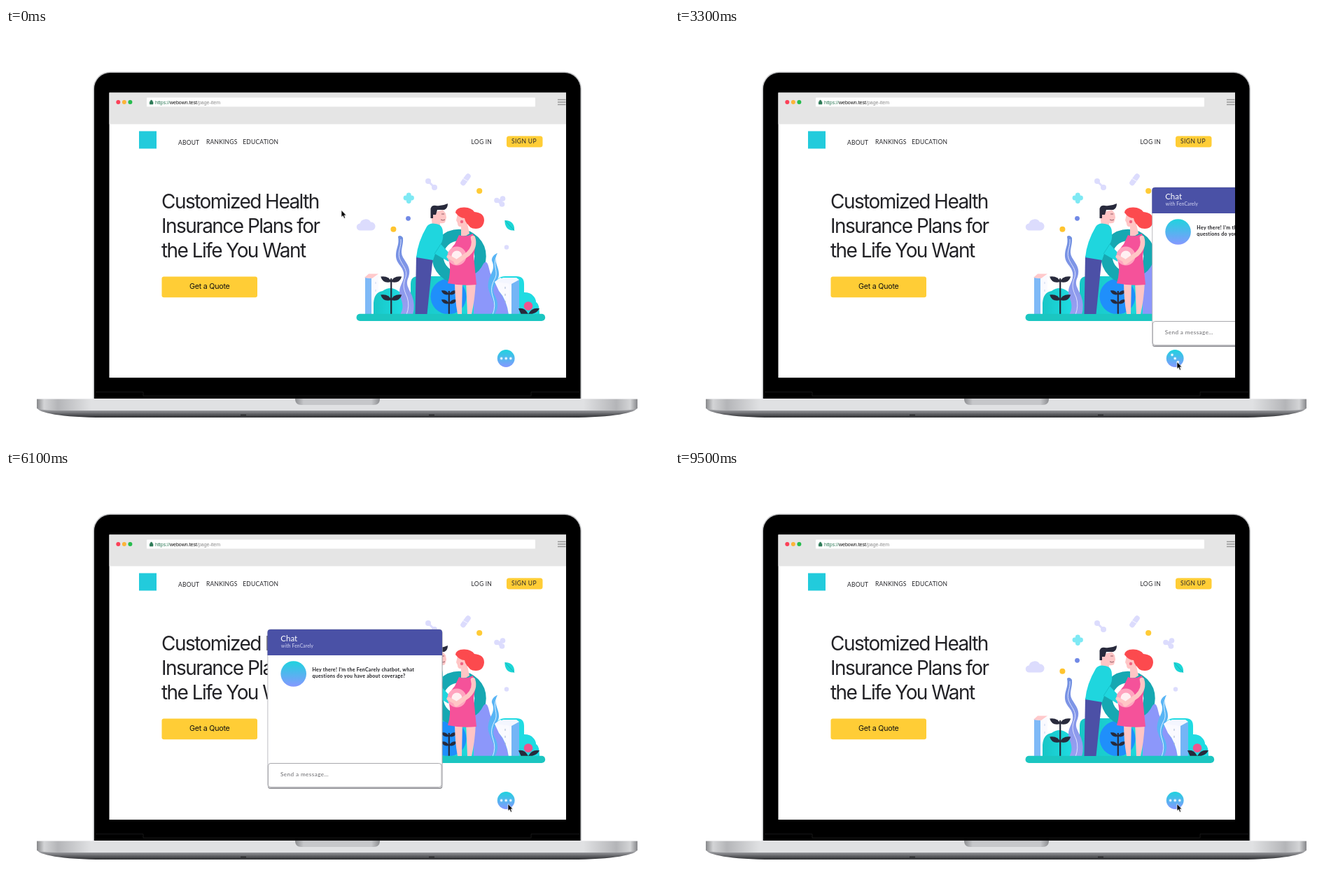
An HTML page that plays this animation: 947x592 px, repeating every 9600 ms.

```html
<!DOCTYPE html>
<html lang="en">
<head>
<meta charset="utf-8">
<title>Chat panel on a laptop</title>
<style>
html, body { margin: 0; width: 100%; height: 100%; overflow: hidden; background: #fff; }
svg { display: block; width: 947px; height: 592px; }
.lato { font-family: Lato, sans-serif; }
.inter { font-family: Inter, sans-serif; font-optical-sizing: none; }
.nav { font-size: 8.5px; letter-spacing: .2px; fill: #26262a; }
.title { font-size: 28px; letter-spacing: -1.55px; fill: #222226; }
.url { font: 7px "Liberation Sans", Arial, sans-serif; }
</style>
</head>
<body>
<svg viewBox="0 0 947 592">
  <defs>
    <linearGradient id="base" x1="0" x2="1" y1="0" y2="0">
      <stop offset="0" stop-color="#86878a"/><stop offset=".012" stop-color="#d3d4d6"/>
      <stop offset=".035" stop-color="#b4b5b8"/><stop offset=".09" stop-color="#e0e1e3"/>
      <stop offset=".91" stop-color="#e0e1e3"/><stop offset=".965" stop-color="#b4b5b8"/>
      <stop offset=".988" stop-color="#d3d4d6"/><stop offset="1" stop-color="#86878a"/>
    </linearGradient>
    <linearGradient id="under" x1="0" x2="0" y1="0" y2="1">
      <stop offset="0" stop-color="#b9babd"/><stop offset=".4" stop-color="#85868a"/>
      <stop offset="1" stop-color="#2c2d30"/>
    </linearGradient>
    <linearGradient id="notch" x1="0" x2="1" y1="0" y2="0">
      <stop offset="0" stop-color="#8d8e91"/><stop offset=".1" stop-color="#c6c7ca"/>
      <stop offset=".9" stop-color="#c6c7ca"/><stop offset="1" stop-color="#8d8e91"/>
    </linearGradient>
    <linearGradient id="aqua" x1="0" x2="0" y1="0" y2="1">
      <stop offset="0" stop-color="#1fd3de"/><stop offset="1" stop-color="#8598ff"/>
    </linearGradient>
    <linearGradient id="bush" x1="0" x2="1" y1="0" y2="0">
      <stop offset="0" stop-color="#18c6c6"/><stop offset="1" stop-color="#1fdde4"/>
    </linearGradient>
    <linearGradient id="weed" x1="0" x2="0" y1="0" y2="1">
      <stop offset="0" stop-color="#6f8fe0"/><stop offset="1" stop-color="#9a9ff2"/>
    </linearGradient>
    <clipPath id="screen"><rect x="147.5" y="92.5" width="652.5" height="407.5"/></clipPath>
    <clipPath id="soil"><rect x="490" y="200" width="300" height="210"/></clipPath>
  </defs>

  <!-- laptop -->
  <path d="M124.500 530V87a24.500 24.500 0 0 1 24.500-24.500H797.500a24.500 24.500 0 0 1 24.500 24.500V530Z" fill="#c3c4c6"/>
  <path d="M126 530V87a23 23 0 0 1 23-23H797.500a23 23 0 0 1 23 23V530Z"/>
  <path d="M128 520.500H196V526H750V520.500H819" fill="none" stroke="#1c1c1e" stroke-width=".8"/>
  <path d="M44 543H902C900 550 868 557 806 557H140C78 557 46 550 44 543Z" fill="url(#under)"/>
  <path d="M44 530H902V544C896 546.500 880 547 860 547H86C66 547 50 546.500 44 544Z" fill="url(#base)"/>
  <path d="M44 530.400H902" stroke="#f0f0f1" stroke-width=".8"/>
  <path d="M413 530H534C534 536 531 539 525 539H422C416 539 413 536 413 530Z" fill="url(#notch)"/>
  <path d="M335 553.500H343M604 553.500H612" stroke="#222224" stroke-width="1.500"/>

  <g clip-path="url(#screen)">
    <rect x="147" y="92" width="654" height="409" fill="#fff"/>
    <rect x="147" y="92" width="654" height="45.500" fill="#e5e5e5"/>
    <circle cx="160.300" cy="106" r="3" fill="#fc4158"/>
    <circle cx="168.900" cy="106" r="3" fill="#fcb438"/>
    <circle cx="177.400" cy="106" r="3" fill="#27bd4e"/>
    <rect x="201" y="99.500" width="555" height="13" rx="1" fill="#fff"/>
    <path d="M205.300 105.500H210V109H205.300ZM206.300 105.500V104.500a1.350 1.350 0 0 1 2.700 0V105.500" fill="#2d7a57" stroke="#2d7a57" stroke-width=".6"/>
    <text class="url" x="213" y="108.500" fill="#2d7a57">https://<tspan fill="#111">webown.test</tspan><tspan fill="#8a8a8a">/page-item</tspan></text>
    <path d="M788 102.500H799.500M788 106H799.500M788 109.500H799.500" stroke="#999" stroke-width="1.700"/>

    <!-- page -->
    <rect x="190" y="147.500" width="25" height="25" fill="#22cbdc"/>
    <g class="lato nav">
      <text x="246" y="167">ABOUT</text>
      <text x="286" y="166">RANKINGS</text>
      <text x="338.200" y="166">EDUCATION</text>
      <text x="664.600" y="166">LOG IN</text>
      <rect x="715" y="154.500" width="51.500" height="16" rx="3.500" fill="#ffcd36"/>
      <text x="722" y="165" style="letter-spacing:.4px">SIGN UP</text>
    </g>
    <g class="inter title">
      <text x="222" y="258">Customized Health</text>
      <text x="222" y="293">Insurance Plans for</text>
      <text x="222" y="328">the Life You Want</text>
    </g>
    <rect x="222.500" y="355.500" width="136.500" height="29.700" rx="3" fill="#ffcd36"/>
    <text class="inter" x="290.800" y="372.800" text-anchor="middle" font-size="10.700" letter-spacing="-.25" fill="#111">Get a Quote</text>

    <!-- floating shapes -->
    <g fill="#dcdcfd">
      <path d="M603 219L612 228" stroke="#dcdcfd" stroke-width="3"/>
      <circle cx="603" cy="219" r="4"/><circle cx="612" cy="228" r="4"/>
      <path d="M653 221.500L660 212" stroke="#dcdcfd" stroke-width="7.500" stroke-linecap="round"/>
      <path d="M653 215.500L659.500 219" stroke="#fff" stroke-width=".8"/>
      <path d="M701 246.500L705 248L709.500 244M705 248L708 252" stroke="#dcdcfd" stroke-width="5"/>
      <circle cx="701" cy="246.500" r="3.800"/><circle cx="709.500" cy="244" r="3.800"/><circle cx="708.500" cy="252" r="3.800"/>
      <path d="M506 289.500a5 5 0 0 1-.5-10a8.500 8.500 0 0 1 15.500-2a6 6 0 0 1 1 12Z"/>
      <circle cx="715" cy="313.500" r="3.200"/>
    </g>
    <path d="M571 243H579.500M575.300 238.800V247.500" stroke="#7ee9f4" stroke-width="6.800" stroke-linecap="round"/>
    <circle cx="676.200" cy="233" r="4.100" fill="#ffcb36"/>
    <circle cx="553.400" cy="287.700" r="4" fill="#ffc42e"/>
    <circle cx="574.500" cy="272.300" r="3.400" fill="#7189e6"/>
    <path d="M712.500 275C722 275 727 281 726 289.500C717 290.500 712 284 712.500 275Z" fill="#1bd6d6"/>
    <path d="M713 275.500L726 289.500" stroke="#16a9ae" stroke-width=".8"/>

    <!-- garden -->
    <g clip-path="url(#soil)">
      <path d="M578 410V366Q578 355 589 355H672Q690 355 690 372V410Z" fill="url(#bush)"/>
      <path d="M701 410V366Q701 355 713 355H729Q740 355 740 366V378Q749 378 753 383Q757 387 757 392Q762 394 762 410Z" fill="#1fdbe2"/>
      <path d="M513 357L522 358V410H513Z" fill="#7eb9f7"/>
      <path d="M522 358L532 353V410H522Z" fill="#fafaff"/>
      <path d="M512 357L518 351.500H532L523 358Z" fill="#ffc9cb"/>
      <path d="M528 363V366M528 374V377M528 384V387" stroke="#c8d6ee"/>
      <path d="M525 410V393Q526 378 538 376Q549 368 560 376Q569 380 569 393V410Z" fill="url(#bush)"/>
      <circle cx="632" cy="384" r="25.500" fill="#1f8ffb"/>
      <circle cx="647" cy="326.500" r="22" fill="#fff"/>
      <circle cx="647" cy="326.500" r="30.500" fill="none" stroke="#16a8b2" stroke-width="16.500"/>
      <path d="M668 410V352Q676 349 682 337Q687 330 690 344Q692 356 700 360Q707 366 704 376Q715 388 718 410Z" fill="#8c97fa"/>
      <path d="M692 410C707 395 685 380 689 364C691 351 700 345 694 333C693 328 698 323 702 322C695 334 705 342 704 353C703 364 692 371 698 382C704 393 703 402 698 410Z" fill="#59b5f5"/>
      <path d="M700 328C695 340 703 347 699 357C693 368 692 375 696 386Q700 397 695 410" fill="none" stroke="#fff" stroke-width=".8"/>
      <path d="M698 363L706 357L722 365V410H718Q715 388 704 376Z" fill="#fafaff"/>
      <path d="M722 365L733 360V410H722Z" fill="#74b5f6"/>
      <path d="M698 363L710 357H729L733 360L722 366Z" fill="#f4f6ff"/>
      <path d="M713 370V373M713 380V383M713 390V393" stroke="#a5b6d0"/>
      <path d="M560 298Q564 295 567 300C568 312 562 318 567 328C573 338 579 344 575 356C570 367 575 371 580 383Q585 396 581 410H563C571 396 563 389 562 378C562 366 570 362 568 350C566 339 556 337 557 323C558 312 562 310 560 298Z" fill="url(#weed)"/>
      <path d="M564 302C565 313 559 319 562 329C566 340 574 345 571 356C566 368 568 374 573 385Q577 397 572 410" fill="none" stroke="#e7eaff" stroke-width=".9"/>
    </g>
    <g id="plants" fill="#282a3c" stroke="#282a3c"></g>
    <path d="M736 410L732 401Q741 399 746 409Q751 399 762 401Q758 409 746 410Z" fill="#282a3c"/>
    <circle cx="746" cy="397.500" r="6.300" fill="#ef548f"/>
    <rect x="500.500" y="408.800" width="269.700" height="10.200" rx="5.100" fill="#1bc6c1"/>

    <!-- man -->
    <path d="M586 326H610L601.500 409H584.500Z" fill="#4c50a6"/>
    <path d="M607 265L624 260L628 265L629 271L627 278Q624 280 620 279V285L609 284Z" fill="#ffc5c5"/>
    <path d="M606.500 272V258Q608 253 614 254Q623 255 631 251Q631 258 626 260H616L614 267H610V272Z" fill="#282a3c"/>
    <path d="M622 266H626M621 274Q624 276 627 274" stroke="#75404e" stroke-width=".8" fill="none"/>
    <path d="M601 284Q605 278 614 280Q624 281 624 293Q625 303 621 309L636 325L632 334L613 323L610 332L586 328Q588 306 601 284Z" fill="#1fd6de"/>
    <path d="M621 309L612 323" stroke="#14b9c1" stroke-width=".8"/>

    <!-- woman -->
    <path d="M641 361H652L651 409H645Q641 388 641 361ZM657 361H671Q670 388 665 409H659Z" fill="#ffc5c5"/>
    <path d="M642 264Q643 256 655 256.500Q665 257 669 263Q683 264 683 275Q682 287 671 287Q661 287 659 278Q654 276 655 267Z" fill="#fc4a4e"/>
    <path d="M645 266Q650 262 657 266L659 280L662 294Q656 299 650 297V284Q645 285 645 279L643 275Z" fill="#ffc5c5"/>
    <path d="M642 264Q650 257 660 264L664 282Q657 282 655 272Q648 272 642 264Z" fill="#fc4a4e"/>
    <circle cx="651" cy="277" r="2.200" fill="#f06683"/>
    <path d="M647 296Q656 300 667 294Q672 310 668 326L672 367Q650 369 631 365Q636 349 633 334Q629 322 641 309Z" fill="#f5529a"/>
    <circle cx="644" cy="326" r="13.500" fill="#ffa4bf"/>
    <circle cx="644" cy="326" r="7.500" fill="#fff0f2"/>
    <path d="M667 300Q671 313 660 323L643 335" fill="none" stroke="#ffc5c5" stroke-width="6.500" stroke-linecap="round" stroke-linejoin="round"/>
    <path d="M632 327L641 332" stroke="#ffc5c5" stroke-width="5" stroke-linecap="round"/>

    <!-- chat button -->
    <circle cx="714.200" cy="472.500" r="12.400" fill="url(#aqua)"/>
    <g transform="translate(714.2 472.500)">
      <g id="dots" fill="#fff">
        <circle cx="-6.600" r="1.800"/><circle r="1.800"/><circle cx="6.600" r="1.800"/>
      </g>
    </g>

    <!-- chat panel -->
    <g id="panel" class="lato">
      <rect x="373.900" y="229" width="249.500" height="227" rx="4" fill="#8f8f93"/>
      <rect x="373.900" y="228" width="249" height="226.500" rx="4" fill="#fff" stroke="#b5b5ba" stroke-width=".8"/>
      <path d="M373.500 265V232a4 4 0 0 1 4-4H619a4 4 0 0 1 4 4V265Z" fill="#4a51a6"/>
      <text x="392.300" y="244.500" font-size="11.500" fill="#fff">Chat</text>
      <text x="393" y="254" font-size="6.600" letter-spacing=".2" fill="#d9dbf5">with FenCarely</text>
      <circle cx="410.700" cy="291.500" r="18.300" fill="url(#aqua)"/>
      <g font-size="7" font-weight="700" letter-spacing=".3" fill="#1c1c20">
        <text x="437.500" y="288">Hey there! I’m the FenCarely chatbot, what</text>
        <text x="437.500" y="297">questions do you have about coverage?</text>
      </g>
      <rect x="374.500" y="419.500" width="247.500" height="34" rx="3.500" fill="#fff" stroke="#a8a8ac"/>
      <text x="392" y="438" font-size="8.200" letter-spacing=".4" fill="#6a6a6e">Send a message…</text>
    </g>

    <path id="cursor" d="M0 0V10L2.300 8L4 11.800L5.700 11L4.100 7.400H7.200Z" stroke="#fff" stroke-width=".7"/>
  </g>
</svg>
<script>
const LOOP = 9600;
const $ = id => document.getElementById(id);

// A stem with mirrored pairs of leaves.
function plant(x, top, size, rows) {
  const leaf = (y, s) =>
    `<path stroke="none" d="M${x} ${y}q${-3 * s} ${-size * .6} ${-size * s} ${-size * .5}q${3 * s} ${size * .7} ${size * s} ${size * .5}Z"/>`;
  return `<path fill="none" stroke-width="2.2" d="M${x} ${top}V409"/>` +
    rows.map(y => leaf(y, 1) + leaf(y, -1)).join("");
}
$("plants").innerHTML = plant(550.2, 358, 15, [363, 389]) + plant(632.8, 376, 11, [381, 394]);

// Rows: time in ms, transform, easing towards the next row.
function play(id, rows) {
  const keys = rows.map(([t, transform, easing = "linear"]) =>
    ({ offset: t / LOOP, transform, easing }));
  keys.push({ offset: 1, transform: keys[keys.length - 1].transform });
  return $(id).animate(keys, { duration: LOOP, iterations: Infinity });
}

const glide = "cubic-bezier(.4,0,.2,1)";
const move = (x, y) => `translate(${x}px, ${y}px)`;
const turn = deg => `rotate(${deg}deg)`;

const anims = [
  play("cursor", [
    [0, move(479, 260.5)], [1800, move(479, 260.5), "ease-in-out"], [2800, move(717, 477.5)]
  ]),
  play("panel", [
    [0, move(429, 0)], [3140, move(429, 0), glide], [3740, move(0, 0)],
    [6100, move(0, 0), glide], [6700, move(429, 0)]
  ]),
  play("dots", [
    [0, turn(0)], [3140, turn(0), glide], [3740, turn(180)],
    [6100, turn(180), glide], [6700, turn(0)]
  ])
];
const start = performance.now();
anims.forEach(a => { a.startTime = start; });
</script>
</body>
</html>
```
